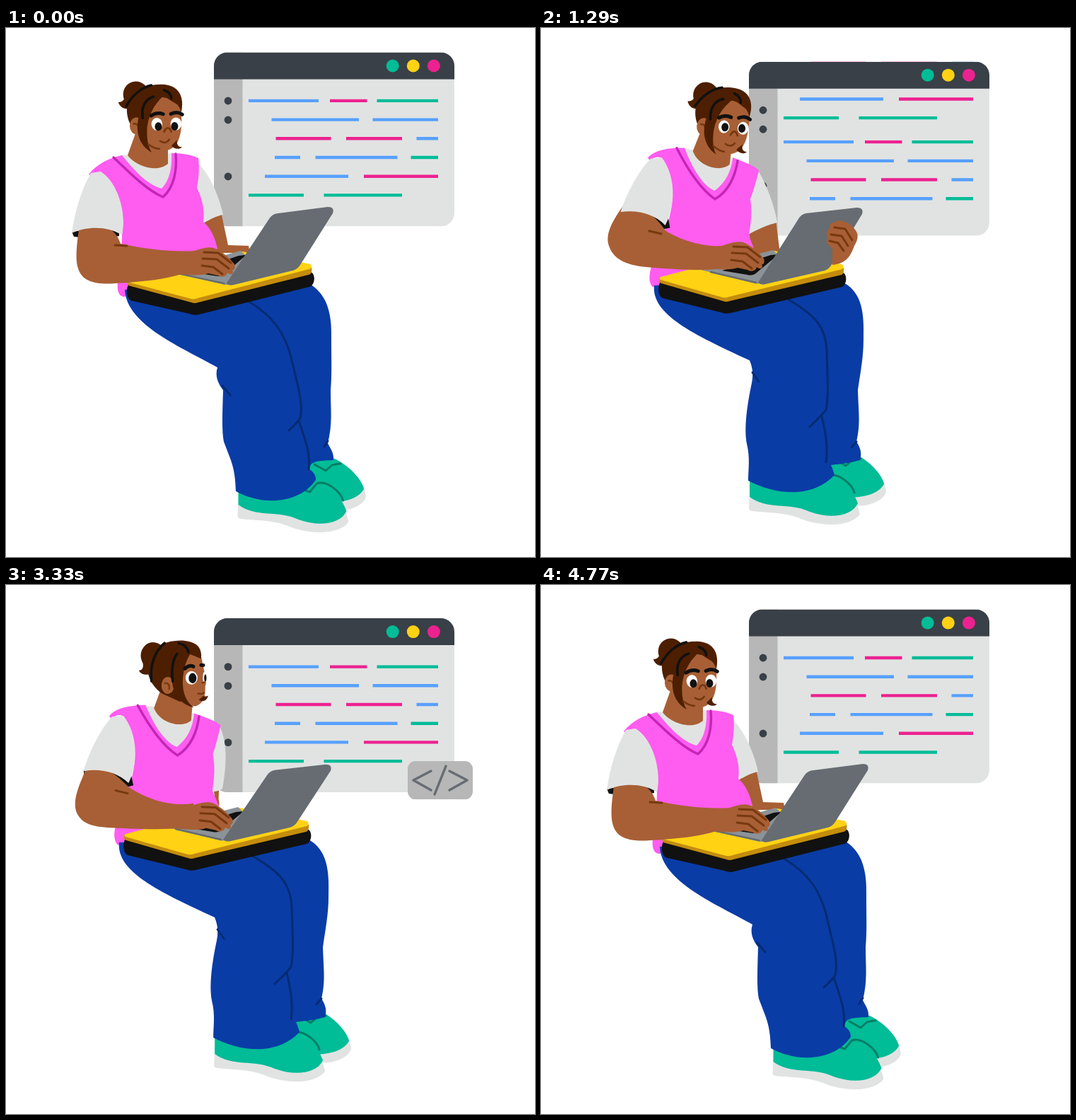
An HTML page with a canvas for the animation above (4.8 s loop, 748 by 748 pixels).

```html
<!DOCTYPE html>
<html lang="en">
<head>
<meta charset="utf-8">
<title>Coding</title>
<style>
html, body { margin: 0; width: 100%; height: 100%; overflow: hidden; background: #fff; }
canvas { display: block; width: 748px; height: 748px; }
</style>
</head>
<body>
<canvas id="stage" width="748" height="748"></canvas>
<script>
const ctx = document.getElementById('stage').getContext('2d');
const LOOP = 4800;
const SKIN = '#a85f35', BROWN = '#77390f', HAIR = '#4d1f00', BLACK = '#111', WHITE = '#e1e3e2',
  PINK = '#ff5cf0', PURPLE = '#c425b5', BLUE = '#0a3ca6', NAVY = '#052c72', TEAL = '#00bc97',
  PINE = '#067d66', YELLOW = '#ffd214', GOLD = '#c48d0e', STEEL = '#666c72', LIGHT = '#8b9298',
  GREY = '#b7b7b7', SLATE = '#394047', SKY = '#57a0ff', ROSE = '#ec2290';

// Poses: 0 lean back, 1 upright, 2 grip, 3 release, 4 look aside, 5 lean in
const BODY = [[0, 0], [750, 1], [900, 1], [1200, 2], [1450, 2], [1800, 3], [2130, 3], [2600, 4],
  [3250, 4], [3850, 5], [3950, 5], [4500, 0], [4800, 0]];
// Leg poses: 0 forward, 1 tucked, 2 raised
const LEGS = [[0, 0], [650, 1], [3300, 1], [3860, 2], [3940, 2], [4400, 0], [4800, 0]];

const lerp = (a, b, u) => a + (b - a) * u;
const clamp = u => Math.max(0, Math.min(1, u));
const ease = u => u * u * (3 - 2 * u);
const ramp = (t, a, b) => ease(clamp((t - a) / (b - a)));

// Piecewise value; each key is [time, value]
function track(keys, t) {
  const i = Math.max(1, keys.findIndex(k => k[0] >= t));
  const [a, va] = keys[i - 1], [b, vb] = keys[i];
  return lerp(va, vb, (t - a) / (b - a));
}

function poseAt(keys, t) {
  const i = Math.max(1, keys.findIndex(k => k[0] >= t));
  const [a, from] = keys[i - 1], [b, to] = keys[i];
  return { from, to, u: ease((t - a) / (b - a)) };
}

const pick = (list, i) => list[Math.min(i, list.length - 1)];

function mixPath(list, p) {
  const a = pick(list, p.from), b = pick(list, p.to);
  if (a === b || p.u === 0) return a;
  const nums = b.match(/-?[\d.]+/g);
  let i = 0;
  return a.replace(/-?[\d.]+/g, n => lerp(+n, +nums[i++], p.u).toFixed(2));
}

const mixList = (list, p) =>
  pick(list, p.from).map((v, i) => lerp(v, pick(list, p.to)[i], p.u));

function fill(d, color) {
  ctx.fillStyle = color;
  ctx.fill(new Path2D(d));
}

function line(d, color, width = 3) {
  ctx.strokeStyle = color;
  ctx.lineWidth = width;
  ctx.stroke(new Path2D(d));
}

function oval(x, y, rx, ry, color) {
  ctx.fillStyle = color;
  ctx.beginPath();
  ctx.ellipse(x, y, rx, ry, 0, 0, 7);
  ctx.fill();
}

function box(x, y, w, h, r, color) {
  ctx.fillStyle = color;
  ctx.beginPath();
  ctx.roundRect(x, y, w, h, r);
  ctx.fill();
}

// Draw inside a frame moved by dx, dy and turned about (px, py)
function within(dx, dy, deg, px, py, draw) {
  ctx.save();
  ctx.translate(px + dx, py + dy);
  ctx.rotate(deg * Math.PI / 180);
  ctx.translate(-px, -py);
  draw();
  ctx.restore();
}

// ---- Code window ----
const ROWS = [
  [[SKY, 343, 442], [ROSE, 458, 510.5], [TEAL, 524.5, 611]],
  [[SKY, 375.5, 499], [SKY, 518.5, 611]],
  [[ROSE, 381.5, 459.5], [ROSE, 481, 560], [SKY, 580.5, 611]],
  [[SKY, 380, 416], [SKY, 437.5, 553.5], [TEAL, 572.5, 611]],
  [[SKY, 366, 484], [ROSE, 506, 611]],
  [[TEAL, 343, 421], [TEAL, 449.5, 560]]
];
const TYPED = [60, 270, 580, 930, 1300, 1818];
const STEP = 26.7, CYCLE = 167.5;
const SCROLL = [[0, 0], [810, 88], [1290, 122.5], [2010, 177], [2200, CYCLE], [4800, CYCLE]];
const BOB = [[0, 0], [810, 122], [1290, 196], [2010, 304], [2760, 422], [3900, 598], [4800, 720]];

function codeRow(segs, y, done) {
  const x0 = segs[0][1], end = lerp(x0, segs[segs.length - 1][2], done);
  for (const [color, a, b] of segs)
    if (end > a) line(`M${a} ${y}H${Math.min(b, end)}`, color, 4.4);
}

function codeWindow(t) {
  const scroll = track(SCROLL, t);
  ctx.save();
  ctx.beginPath();
  ctx.roundRect(294, 0, 340, 246, 19);
  ctx.clip();
  box(294, 0, 340, 246, 0, WHITE);
  box(294, 0, 40.5, 246, 0, GREY);
  ctx.lineCap = 'butt';
  ROWS.forEach((segs, i) => {
    const y = 68.5 + STEP * i - scroll;
    codeRow(segs, y, 1);
    codeRow(segs, y + CYCLE, clamp((t - TYPED[i]) / 300));
  });
  ctx.lineCap = 'round';
  box(294, 0, 340, 38, 0, SLATE);
  ctx.restore();
  [68.5, 95.5, 175.5].forEach(y => oval(314, y, 5.4, 5.4, SLATE));
  [TEAL, YELLOW, ROSE].forEach((c, i) => oval(546.7 + 29.1 * i, 19, 9, 9, c));
}

function tag(t) {
  const size = ramp(t, 2620, 2750) * (1 - ramp(t, 4560, 4700));
  if (size <= 0) return;
  const open = ramp(t, 2850, 3290) * (1 - ramp(t, 4050, 4560));
  const w = lerp(55, 92, open), tilt = 8 * open, tall = lerp(15.5, 20, open);
  ctx.save();
  ctx.translate(lerp(672.7, 614, open), lerp(217, 229, open));
  ctx.scale(size, size);
  box(-w / 2, -27, w, 54, 11, GREY);
  line(`M${tilt} ${-tall}L${-tilt} ${tall}`, STEEL, 3.4);
  if (open > 0) {
    ctx.globalAlpha = open;
    for (const s of [-open, open]) line(`M${13 * s} -13L${38 * s} 0L${13 * s} 14`, STEEL, 3.4);
  }
  ctx.restore();
}

// ---- Legs ----
const PANTS = [
  'M168 370C170 420 250 452 299 480C295 492 300 503 307 512C306 545 305 570 308 585C318 612 324 620 325 655C362 676 415 673 438 639C438 632 435 628 429 624C430 612 440 612 463 611C464 600 458 594 455 587C462 560 459 540 459 512C461 490 460 470 460 440C461 405 455 378 430 362Z',
  'M160 364C156 405 215 433 295 470C300 482 300 492 298 502C291 535 287 566 291 588C296 608 293 624 293 640C335 662 385 664 415 632C413 626 412 622 410 618C425 616 438 615 451 611C454 602 452 594 446 585C452 560 449 545 448 512C452 485 456 465 456 440C457 405 455 375 428 360Z',
  'M156 358C153 404 222 433 300 467C299 478 305 488 307 492C303 525 298 555 303 578C310 605 310 615 310 636C350 658 395 660 426 628C426 622 422 618 416 613C420 604 436 605 453 606C456 596 450 590 446 580C453 555 452 530 453 505C458 480 461 455 461 420C461 385 453 360 430 348Z'
];
const CREASES = [
  'M342 386C380 408 395 435 403 465C412 505 421 530 416 552C410 560 405 564 400 569M414 555C422 580 431 600 428 624M306 506L317 519M455 584L450 592',
  'M350 384C385 405 402 420 404 455C405 490 407 520 403 540C395 550 388 556 380 564M397 549C402 570 406 590 403 614M299 487L308 500M446 585L439 593',
  'M344 374C385 398 402 415 406 450C411 485 416 515 413 535C406 545 400 552 393 557M408 542C414 565 418 590 416 613M307 485L316 498M445 580L440 587'
];
// Back shoe x, y, then front shoe x, y, turn
const SHOES = [[21, 7, 33.5, 11, 0], [0, 0, 0, 0, 0], [-3, -4, 15.5, 2, 3.3]];

function legs(p) {
  const [bx, by, fx, fy, turn] = mixList(SHOES, p);
  within(bx, by, 0, 0, 0, () => {
    fill('M430 664C465 663 482 650 485 641L488 655C486 669 460 678 442 675Z', WHITE);
    fill('M405 600L441 601C464 610 484 634 485 645C475 662 450 663 440 664L408 640Z', TEAL);
    line('M415 610L431 619L440 611C445 610 449 609 452 609', PINE);
  });
  within(fx, fy, turn, 440, 690, () => {
    fill('M295 655L294 679Q294 682 298 683C322 686 345 684 370 695C400 706 440 705 451 687L446 670Z', WHITE);
    fill('M295 634L295 663C320 682 350 670 380 684C410 695 440 690 448 672C440 652 430 640 413 632Z', TEAL);
    line('M385 641L396 645L406 633C420 628 440 645 443 657', PINE);
  });
  fill(mixPath(PANTS, p), BLUE);
  line(mixPath(CREASES, p), NAVY);
}

// ---- Torso ----
const VEST = [
  'M117 207C128 192 148 183 164 180C180 200 200 222 220 227C232 215 235 195 234 177C252 177 264 180 272 184C274 200 272 215 270 226C279 245 281 260 279 274C290 283 296 298 299 312L240 372L166 380C158 378 157 370 158 358C160 335 164 315 164 293C170 262 157 218 134 204C128 203 124 204 120 209Z',
  'M141 187C150 175 170 171 192 170C203 195 220 222 238 228C252 217 260 200 261 180C280 186 292 190 299 196C296 210 293 225 289 237C293 255 292 270 290 288C293 297 297 302 300 312L240 372L158 369C152 362 152 352 155 340C163 315 168 300 171 288C183 258 182 212 161 187C157 184 150 185 144 191Z'
];
const TRIM = [
  'M152 183C175 205 200 230 222 239C238 225 242 200 240 178',
  'M181 171C195 195 215 225 239 240C258 228 266 205 268 184'
];
const SHIRT = [
  'M160 180C176 202 198 226 220 232C238 220 239 198 237 177Z',
  'M188 170C200 197 216 226 238 233C258 222 264 202 265 181Z'
];
const NECK = [
  'M188 135L172 180C182 194 212 206 229 192L229 140Z',
  'M218 132L204 174C213 196 245 202 257 190L260 140Z'
];
const SLEEVE = [
  'M120 205C106 230 97 260 93 290C115 280 145 280 164 293C171 262 158 218 134 203Z',
  'M145 188C130 205 114 238 107 266C130 261 155 266 171 281C184 255 183 212 161 186Z'
];
const CUFF = [
  'M93 288L96 295L104 296L150 296L160 294L160 280Z',
  'M107 264L108 272L114 273L168 287L178 284L174 268Z'
];
const FAR_B = 'M296 194C310 213 324 245 329 268C316 272 300 280 288 288L283 240Z';
const FAR_D = 'M296 194C308 215 310 245 304 285C301 288 297 289 290 290L283 240Z';
const FAR_SLEEVE = ['M270 190C288 205 302 240 307 264C297 266 290 270 279 276L266 225Z',
  FAR_B, FAR_B, FAR_B, FAR_D, FAR_D];
const FAR_ARM_B = 'M288 280L298 316L337 320L336 314L334 304L327 266Z';
const FAR_ARM_D = 'M291 285L296 310L300 310L300 305L299 300L299 285Z';
const FAR_ARM = ['M278 270L300 318L345 318L343 308L314 307L304 260Z',
  FAR_ARM_B, FAR_ARM_B, FAR_ARM_B, FAR_ARM_D, FAR_ARM_D];

function torso(p) {
  fill(mixPath(FAR_ARM, p), SKIN);
  fill(mixPath(FAR_SLEEVE, p), WHITE);
  fill(mixPath(SHIRT, p), WHITE);
  fill(mixPath(NECK, p), SKIN);
  fill(mixPath(VEST, p), PINK);
  line(mixPath(TRIM, p), PURPLE, 3.4);
}

// ---- Near arm ----
const ARM_R = 'M114 256C106 280 94 300 99 320C107 342 130 343 160 344C200 346 225 346 248 344L262 342L265 309C235 314 205 305 178 289C168 284 150 255 114 256Z';
const ARM = [
  'M104 278C101 300 97 325 102 340C108 360 130 363 155 361C195 359 225 355 248 348L266 349L268 315C235 317 200 313 162 305C155 282 130 270 104 278Z',
  'M114 256C103 285 97 305 101 322C108 342 130 345 160 345C200 344 225 343 245 338L262 337L262 303C235 308 205 300 176 289C168 284 150 255 114 256Z',
  'M117 250C103 270 90 290 96 308C104 332 130 337 160 339C200 342 225 343 248 341L262 340L265 308C240 310 210 306 178 288C170 281 155 250 117 250Z',
  ARM_R, ARM_R,
  'M122 247C105 275 96 290 99 308C106 330 130 335 160 337C200 338 225 340 245 340L265 338L268 303C235 308 210 303 184 289C174 280 160 248 122 247Z'
];
const ELBOW = ['M154 307L171 308', 'M155 291L172 294', 'M153 287L170 291',
  'M155 291L172 295', 'M155 291L172 295', 'M156 284L173 288'];
const HAND = [[0, 0, 0], [-1, -9, -12], [-8, -8, 0], [-3, -3, 0], [-3, -3, 0], [-4, -10, 3]];

function nearArm(p) {
  fill(mixPath(ARM, p), SKIN);
  line(mixPath(ELBOW, p), BROWN);
  const [x, y, turn] = mixList(HAND, p);
  within(x, y, turn, 262, 330, () => {
    fill('M245 318L264 316C275 312 285 309 294 311C306 316 316 325 323 334C325 340 322 343 320 342C323 348 318 350 313 346C312 352 304 353 300 350L286 347C278 350 265 350 245 348Z', SKIN);
    line('M280 317L300 318L318 332M278 326L298 327L315 340M277 336L293 338L306 348', BROWN);
  });
}

// ---- Board, laptop and gripping hand ----
const LAP = [[5, 2, -.9], [0, 0, 0], [3.5, -8, -2.7]];
// Screen shear and stretch
const SCREEN = [[0, 1], [0, 1], [.05, 1], [0, 1], [0, 1], [0, 1.04]];

function board() {
  fill('M171 357L262 385L424 345C433 345 434 361 426 366L268 403Q261 405 254 402L172 382C165 379 164 361 171 357Z', BLACK);
  fill('M167 353L167 358Q167 360 170 361L257 386Q262 388 267 386L425 349Q429 347 428 339Z', GOLD);
  fill('M169 352L215 340L330 315L425 334Q430 337 426 341L266 380Q262 382 257 381L169 356Q166 354 169 352Z', YELLOW);
  fill('M222 341L328 314L345 330L316 358Q310 363 302 361Z', LIGHT);
  line('M240 345L304 360', STEEL, 2.5);
  fill('M256 343L325 321L336 320L306 345Q300 351 292 349Z', BLACK);
}

function screen(p) {
  const [lean, tall] = mixList(SCREEN, p);
  ctx.save();
  ctx.translate(0, 362);
  ctx.transform(1, 0, lean, tall, 0, 0);
  ctx.translate(0, -362);
  fill('M370 268Q374 263 380 262L452 254Q462 254 459 263L412 335Q408 341 402 343L318 362Q311 364 307 360Z', STEEL);
  ctx.restore();
}

function backHand(t) {
  const out = ramp(t, 480, 780) * (1 - ramp(t, 2100, 2400));
  if (out <= 0) return;
  within(lerp(-60, t < 1400 ? -6 : 0, out), t < 1400 ? -2 * out : 0, 0, 0, 0, () => {
    fill('M405 338L428 338C448 325 462 312 467 291C467 278 464 266 459 268C453 275 457 282 453 287L425 306Z', SKIN);
    line('M460 278C461 290 455 300 447 308M447 294L442 306M436 316L430 324', BROWN);
  });
}

function frontHand() {
  fill('M414 275C420 270 435 272 444 285C450 292 448 300 443 308C438 322 432 333 412 335L412 311C404 306 402 300 406 297C402 290 404 286 408 284C407 278 410 275 414 275Z', SKIN);
  line('M415 282L430 284L440 300M410 292L425 294L434 308M408 301L420 304L428 315', BROWN);
}

// ---- Head ----
const HEAD = [[-32, 1, -1], [0, 0, 0], [10, 4, 4.5], [0, 2, 4], [0, 0, 0], [12, 3, 7]];
// Pupil inset and drop
const GAZE = [[2, 3.5], [2, 3], [1.5, .5], [1, 1], [1, 1], [2, 2]];

function headFront(p) {
  const [inset, drop] = mixList(GAZE, p);
  oval(217, 92.5, 18, 18.5, HAIR);
  fill('M201 92C202 98 199 103 192 103C194 111 203 117 216 109Z', HAIR);
  fill('M208 134C194 100 218 78 254 79C278 80 287 97 280 122L268 112L230 160Z', HAIR);
  oval(217, 137, 9.5, 12, SKIN);
  line('M213 134C217 133 220 136 220 141', BROWN, 2.5);
  fill('M252 97C268 98 280 108 281 122C281 140 280 152 274 162C268 172 255 175 247 173C236 168 228 160 228 140C228 120 236 103 252 97Z', SKIN);
  fill('M262 90C246 102 235 118 232 140C231 155 233 167 238 175C222 166 215 148 220 126C222 105 240 88 262 90Z', HAIR);
  fill('M254 90C260 101 272 104 281 112C284 92 270 80 254 84Z', HAIR);
  fill('M274 158C273 166 277 168 281 168C277 172 270 171 266 166Z', HAIR);
  line('M203 109C211 95 224 83 239 80M226 126C224 111 230 99 242 96M257 87C264 90 267 95 267 99', BLACK, 3.6);
  line('M238 123C244 119 250 119 255 121M266 121C272 118 278 119 282 122', BLACK, 5);
  for (const [x, side] of [[246, 1], [273, -1]]) {
    oval(x, 135, 7.8, 9, '#fff');
    oval(x + inset * side, 135 + drop, 5, 6, BLACK);
  }
  line('M256 146C259 139 264 139 266 146', BROWN, 2.8);
  line('M250 159C255 163 261 161 263 157M233 163C238 167 244 170 249 170', BROWN, 2.6);
}

function headSide() {
  oval(207, 100, 17.5, 19, HAIR);
  fill('M192 108C194 115 193 121 187 121C190 128 201 130 210 120Z', HAIR);
  fill('M221 154C188 132 192 84 236 79C262 76 277 84 272 106L246 165Z', HAIR);
  fill('M252 95C268 90 275 95 277 110C280 125 284 135 281 143C281 155 281 165 268 171C250 172 240 160 240 140C240 120 243 103 252 95Z', SKIN);
  oval(228, 142, 9, 12, SKIN);
  line('M224 139C228 138 231 141 230 147', BROWN, 2.5);
  fill('M264 91C253 104 250 120 249 136C249 152 254 165 265 173C247 169 236 156 234 136C231 112 243 89 264 91Z', HAIR);
  fill('M250 92C260 99 269 101 275 104C277 84 262 78 250 82Z', HAIR);
  fill('M279 156C281 158 283 157 285 156C284 163 277 166 272 162Z', HAIR);
  line('M205 136C202 112 210 93 223 82M235 136C232 117 236 103 241 97M243 82C251 84 256 89 257 95', BLACK, 3.6);
  line('M252 118C256 114 261 113 264 115M275 113L278 113', BLACK, 5);
  oval(261.5, 131, 8.5, 9.5, '#fff');
  oval(263, 131.5, 5.5, 7.2, BLACK);
  oval(280, 130, 2.6, 8, '#fff');
  oval(281, 131, 1.6, 5, BLACK);
  line('M277 138L280 137M271 153C274 154 277 154 279 152', BROWN, 2.5);
}

function draw(t) {
  const p = poseAt(BODY, t), lp = poseAt(LEGS, t);
  ctx.clearRect(0, 0, 748, 748);
  ctx.lineCap = ctx.lineJoin = 'round';

  const top = 34.5 + 6.75 * (1 - Math.cos(track(BOB, t) * Math.PI / 180));
  within(0, top, 0, 0, 0, () => {
    codeWindow(t);
    tag(t);
  });

  const [turn] = mixList([[0], [0], [3.3], [.5], [1.4], [5.6]], p);
  const lean = f => within(0, 0, turn, 208, 360, f);
  lean(() => torso(p));
  legs(lp);

  const [x, y, tip] = mixList(LAP, lp);
  const onLap = f => within(x, y, tip, 262, 386, f);
  const grip = t > 1020 && t < 1740;
  onLap(board);
  if (!grip) backHand(t);
  lean(() => fill(mixPath(CUFF, p), BLACK));
  nearArm(p);
  lean(() => fill(mixPath(SLEEVE, p), WHITE));
  onLap(() => screen(p));
  if (grip) frontHand();

  const [hx, hy, nod] = mixList(HEAD, p);
  const side = t > 2350 && t < 4220;
  within(hx, hy, nod, 240, 170, () => side ? headSide() : headFront(p));
}

function tick() {
  draw(performance.now() % LOOP);
  requestAnimationFrame(tick);
}
tick();
</script>
</body>
</html>
```
